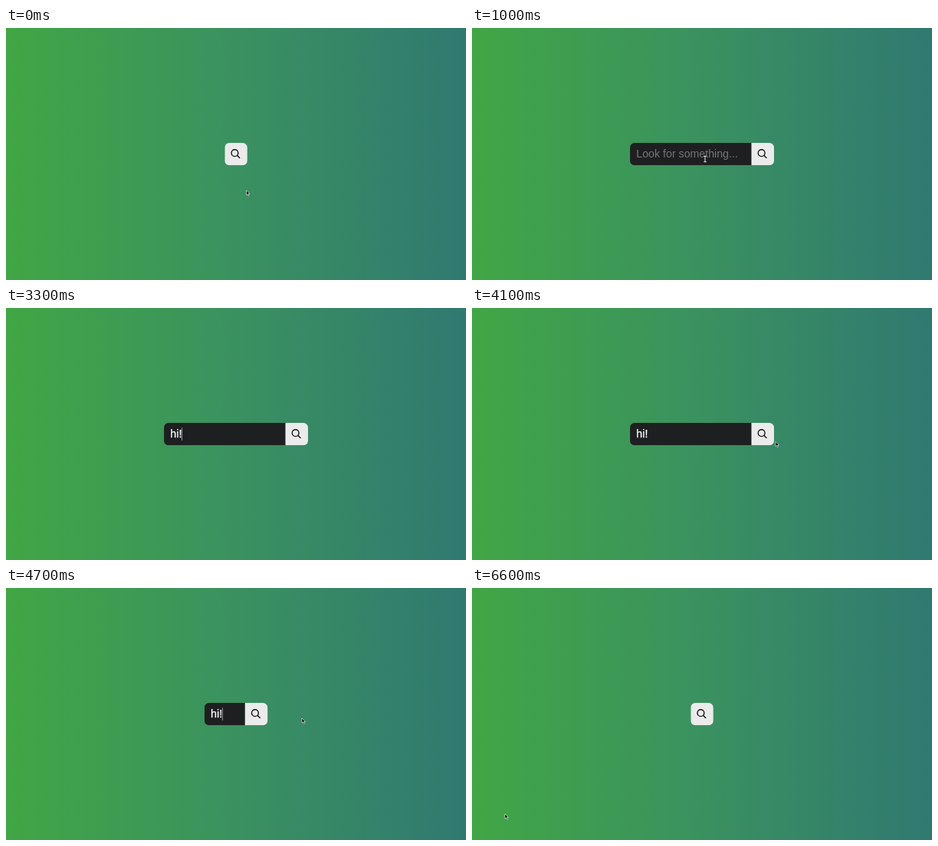
An HTML page that plays this animation: 600 px wide and 329 px high, repeating every 6700 ms.

```html
<!DOCTYPE html>
<html lang="en">
<head>
<meta charset="utf-8">
<title>Expanding search field</title>
<style>
  html, body { margin: 0; width: 100%; height: 100%; overflow: hidden; background: #3a915d; }
  svg { display: block; width: 100%; height: 100%; }
  text { font: 14.2px "Liberation Sans", Arial, sans-serif; fill: #757575; }
  text.typed { fill: #fff; stroke: #fff; stroke-width: 0.25px; }
</style>
</head>
<body>
<svg viewBox="0 0 600 329" xmlns="http://www.w3.org/2000/svg">
  <defs>
    <linearGradient id="bg">
      <stop offset="0" stop-color="#41a645"/>
      <stop offset="0.5" stop-color="#3a9160"/>
      <stop offset="1" stop-color="#307971"/>
    </linearGradient>
    <clipPath id="barClip"><rect id="barShape" y="150" height="29.3" rx="6"/></clipPath>
    <clipPath id="textClip"><rect id="textShape" y="150" height="29.3"/></clipPath>
  </defs>
  <rect width="600" height="329" fill="url(#bg)"/>
  <g clip-path="url(#barClip)">
    <rect id="field" y="150" height="29.3" fill="#1e1f21"/>
    <g clip-path="url(#textClip)">
      <text id="label" y="169.4"></text>
      <rect id="caret" y="156.3" width="0.8" height="16.6" fill="#b0b0b0"/>
    </g>
    <g id="button">
      <rect y="150" width="30" height="29.3" fill="#ebebeb"/>
      <g fill="none" stroke="#111" stroke-width="1.4" stroke-linecap="round">
        <circle cx="13.1" cy="163.2" r="4.4"/>
        <path d="M16.4 166.5L19.4 169.5"/>
      </g>
    </g>
  </g>
  <path id="arrow" d="M0 0V6.2L1.5 4.9L2.5 7.2L3.5 6.7L2.5 4.5H4.4Z"
    fill="#000" stroke="#fff" stroke-width="0.6" stroke-linejoin="round"/>
  <path id="beam" d="M-1.6 -3.6H1.6M0 -3.6V3.6M-1.6 3.6H1.6"
    fill="none" stroke="#ddd" stroke-width="1.1"/>
</svg>
<script>
const LOOP = 6700, STEP = 100, BLINK = 500;
const BUTTON = 29.4, FIELD = 158.5, PAD = 8.3, PAD_END = 12.5;
const OPEN_AT = 587, CLOSE_AT = 4564, MORPH = 350;
const FOCUS_AT = 500, HIDE_AT = 1700, SHOW_AT = 3600;

const keys = [{ at: 1700, ch: "h" }, { at: 2000, ch: "i" }, { at: 3300, ch: "!" }];

// pointer glides: bend is the sideways bulge of the path, downwards
const home = { x: 313.5, y: 212 };
const glides = [
  { from: 0, to: 100, x: 305.5, y: 179 },
  { from: 200, to: 400, x: 304, y: 171 },
  { from: 3500, to: 4100, x: 396, y: 174.5, bend: 16 },
  { from: 4100, to: 4500, x: 386, y: 170 },
  { from: 5100, to: 5300, x: 30.5, y: 194, bend: -24 },
  { from: 5400, to: 5600, x: 80, y: 210 },
  { from: 6000, to: 6600, x: 43, y: 295 }
];

const $ = id => document.getElementById(id);
const set = (id, attrs) => {
  for (const name in attrs) $(id).setAttribute(name, attrs[name]);
};
const show = (id, on) => set(id, { visibility: on ? "visible" : "hidden" });
const clamp = v => Math.min(1, Math.max(0, v));
const smooth = k => k * k * (3 - 2 * k);

function pointerAt(t) {
  let { x, y } = home;
  for (const g of glides) {
    const k = smooth(clamp((t - g.from) / (g.to - g.from)));
    x += (g.x - x) * k;
    y += (g.y - y) * k + (g.bend || 0) * Math.sin(Math.PI * k);
  }
  return [x, y];
}

// the CSS "ease" curve, cubic-bezier(.25, .1, .25, 1)
function ease(x) {
  if (x <= 0 || x >= 1) return clamp(x);
  let lo = 0, hi = 1, s = 0.5;
  for (let i = 0; i < 24; i++) {
    s = (lo + hi) / 2;
    if (0.75 * s * (1 - s) + s ** 3 < x) lo = s; else hi = s;
  }
  return 0.3 * s * (1 - s) ** 2 + 3 * s * s * (1 - s) + s ** 3;
}

// every key press restarts the blink
function caretOn(t, pressed) {
  const since = pressed.length ? pressed[pressed.length - 1].at : FOCUS_AT;
  return t >= since && Math.floor((t - since) / BLINK) % 2 === 0;
}

function draw(t) {
  const open = ease((t - OPEN_AT) / MORPH) - ease((t - CLOSE_AT) / MORPH);
  const field = FIELD * open, width = BUTTON + field;
  const left = 300 - width / 2, split = left + field;
  const textX = left + PAD;

  set("barShape", { x: left, width });
  set("field", { x: left, width: field });
  set("textShape", { x: textX - 0.5, width: Math.max(0, field - PAD - PAD_END + 0.5) });
  set("button", { transform: `translate(${split} 0)` });

  const pressed = keys.filter(k => k.at <= t);
  const typed = pressed.map(k => k.ch).join("");
  $("label").textContent = typed || "Look for something...";
  set("label", { x: textX, class: typed ? "typed" : "" });

  const typedWidth = typed ? $("label").getComputedTextLength() : 0;
  set("caret", { x: textX + typedWidth - 0.2 });
  show("caret", caretOn(t, pressed));

  const [x, y] = pointerAt(t);
  const visible = t < HIDE_AT || t >= SHOW_AT;
  const inField = x > left && x < split && y > 150 && y < 179.3;
  const transform = `translate(${x} ${y})`;
  set("arrow", { transform });
  set("beam", { transform });
  show("arrow", visible && !inField);
  show("beam", visible && inField);
}

const start = performance.now();
function tick() {
  const t = (performance.now() - start) % LOOP;
  draw(Math.floor(t / STEP) * STEP);
  requestAnimationFrame(tick);
}
tick();
</script>
</body>
</html>
```
